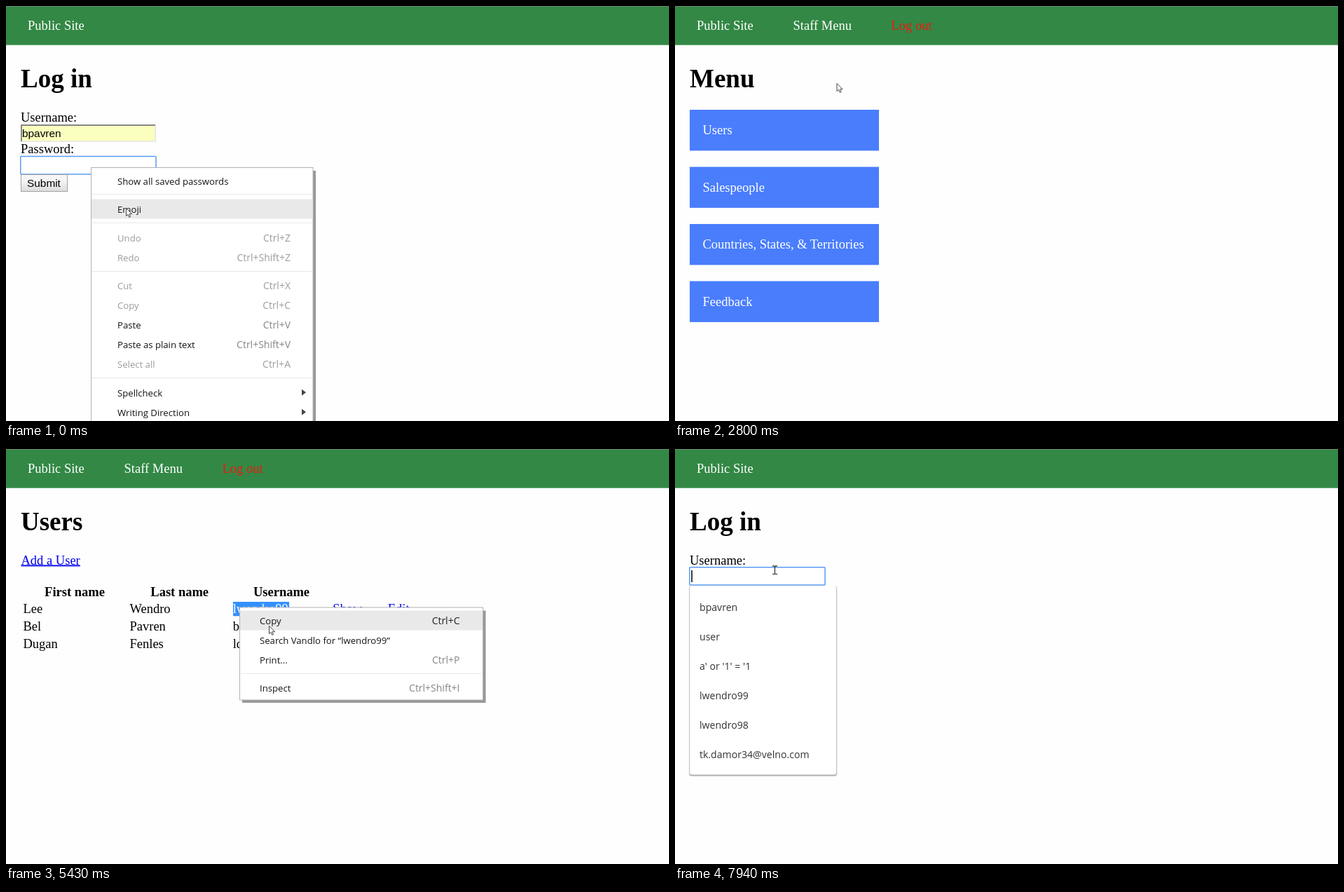
Write an HTML page that moves like this. It is 946x592 px and loops after 8 s.

```html
<!DOCTYPE html>
<html lang="en">
<head>
<meta charset="utf-8">
<title>Log in</title>
<style>
  html, body { margin: 0; width: 100%; height: 100%; overflow: hidden; background: #fefefe; }
  svg { display: block; width: 946px; height: 592px; }
  text { font: 18.5px "Liberation Serif", "Times New Roman", serif; white-space: pre; }
  .h1 { font-size: 37px; font-weight: bold; }
  .th { font-weight: bold; text-anchor: middle; }
  .link { fill: #00e; text-decoration: underline; }
  .field { font: 15.4px "Liberation Sans", Arial, sans-serif; }
  .item { font: 13.15px "Open Sans", "Noto Sans", sans-serif; }
  .key { font: 14px "Open Sans", "Noto Sans", sans-serif; text-anchor: end; }
  .option { font: 14.1px "Open Sans", "Noto Sans", sans-serif; }
</style>
</head>
<body>
<svg id="stage" viewBox="0 0 946 592" xmlns="http://www.w3.org/2000/svg"></svg>
<script>
const LOOP = 8000;
const stage = document.getElementById("stage");

function el(parent, tag, attrs = {}, content) {
  const node = document.createElementNS("http://www.w3.org/2000/svg", tag);
  for (const name in attrs) node.setAttribute(name, attrs[name]);
  if (content !== undefined) node.textContent = content;
  parent.appendChild(node);
  return node;
}
const group = parent => el(parent, "g");
const text = (parent, x, y, str, cls = "", fill = "#000") =>
  el(parent, "text", { x, y, class: cls, ...(cls === "link" ? {} : { fill }) }, str);
const rect = (parent, x, y, width, height, fill, more = {}) =>
  el(parent, "rect", { x, y, width, height, fill, ...more });
const path = (parent, d, fill, more = {}) => el(parent, "path", { d, fill, ...more });
const show = (node, on) => node.setAttribute("visibility", on ? "inherit" : "hidden");
const focusRing = (parent, y) =>
  rect(parent, 20.75, y, 193.3, 25.3, "#fff", { stroke: "#5a9cf2", "stroke-width": 1.5, rx: 1 });

// Shared header
rect(stage, 0, 0, 946, 592, "#fefefe");
rect(stage, 0, 0, 946, 55.7, "#338845");
rect(stage, 0, 0, 946, 1, "#6f8575");
text(stage, 31, 34.2, "Public Site", "", "#fff");
const staffNav = group(stage);
text(staffNav, 168.5, 34.2, "Staff Menu", "", "#fff");
text(staffNav, 308.5, 34.2, "Log out", "", "#f01810");

// Log in page
const login = group(stage);
text(login, 21, 115.5, "Log in", "h1");
text(login, 21, 164.5, "Username:");
text(login, 21, 210, "Password:");

const filledName = group(login);
rect(filledName, 21, 169, 193, 25, "#e6e6e6");
path(filledName, "M21 194V169H214L212 171H23V192Z", "#858585");
rect(filledName, 23, 171, 189.3, 21.3, "#faffbd");
text(filledName, 23, 187.2, "bpavren", "field");

const plainName = group(login);
rect(plainName, 21.5, 169.5, 192, 24, "#fff", { stroke: "#a9a9a9" });
const activeName = group(login);
focusRing(activeName, 168.8);
rect(activeName, 23.3, 173, 1.5, 17, "#000");

rect(login, 21.5, 215.5, 192, 24, "#fff", { stroke: "#a9a9a9" });
const activePass = focusRing(login, 214.6);
const dots = text(login, 23, 232.4, "•".repeat(12), "field");

const shade = el(el(stage, "defs"), "linearGradient", { id: "shade", x1: 0, y1: 0, x2: 0, y2: 1 });
el(shade, "stop", { offset: 0.35, "stop-color": "#f5f5f5" });
el(shade, "stop", { offset: 1, "stop-color": "#dcdcdc" });
rect(login, 21.5, 240.5, 66, 24, "url(#shade)", { stroke: "#a2a2a2" });
text(login, 30, 258, "Submit", "field");

// Saved name suggestions
const saved = group(login);
rect(saved, 20, 197, 211.5, 270, "#000", { rx: 4, opacity: 0.1 });
rect(saved, 20.2, 195, 210.8, 271.4, "#b4b4b4", { rx: 4 });
rect(saved, 21, 195, 209.2, 269.6, "#fff", { rx: 3.5 });
["bpavren", "user", "a' or '1' = '1", "lwendro99", "lwendro98", "tk.damor34@velno.com"]
  .forEach((name, i) => text(saved, 35, 231 + 42 * i, name, "option", "#333"));

// Staff menu page
const staff = group(stage);
text(staff, 21, 115.5, "Menu", "h1");
const tiles = ["Users", "Salespeople", "Countries, States, & Territories", "Feedback"].map((name, i) => {
  const y = 148 + 81.5 * i;
  const tile = rect(staff, 21, y, 270, 58.4, "#497dfc");
  text(staff, 39.5, y + 35.3, name, "", "#fff");
  return tile;
});

// Users page
const users = group(stage);
text(users, 21, 115.5, "Users", "h1");
text(users, 21.5, 164.5, "Add a User", "link");
text(users, 98, 209.5, "First name", "th");
text(users, 247.7, 209.5, "Last name", "th");
text(users, 393, 209.5, "Username", "th");
[["Lee", "Wendro", "lwendro99"], ["Bel", "Pavren", "bpavren"], ["Dugan", "Fenles", "ldfenles"]]
  .forEach((row, i) => {
    const y = 234.4 + 25 * i;
    row.forEach((cell, c) => text(users, [24.5, 176.5, 323.7][c], y, cell));
    text(users, 466.3, y, "Show", "link");
    text(users, 544.7, y, "Edit", "link");
  });
const clip = el(el(stage, "defs"), "clipPath", { id: "picked" });
const pickedArea = rect(clip, 324, 218, 80, 20.6, "#000");
const picked = el(users, "g", { "clip-path": "url(#picked)" });
rect(picked, 324, 218, 80, 20.6, "#3390ff");
text(picked, 323.7, 234.4, "lwendro99", "", "#fff");

// Context menus. Row: [centre, label, shortcut, disabled]
function contextMenu(x, y, w, h, rows, lines, keyX) {
  const g = group(stage);
  rect(g, x + 4, y + 5, w - 1.5, h - 2.5, "#989898");
  rect(g, x + 0.5, y + 0.5, w - 2, h - 2, "#fff", { stroke: "#b2b2b2" });
  const mark = rect(g, x + 1, 0, w - 3, 28, "#e9e9e9");
  lines.forEach(ly => rect(g, x + 2, ly, w - 5, 1, "#e6e6e6"));
  const keys = rows.map(([cy, label, key, off]) => {
    text(g, x + 38, cy + 4.8, label, "item", off ? "#9c9c9c" : "#151515");
    if (key === ">") path(g, `M${x + 301} ${cy - 5.2}l6 4.5l-6 4.5z`, "#444");
    return key && key !== ">" ? text(g, keyX, cy + 4.8, key, "key", off ? "#9c9c9c" : "#858585") : null;
  });
  const hover = cy => {
    const at = rows.findIndex(row => !row[3] && Math.abs(row[0] - cy) <= 14);
    show(mark, at >= 0);
    if (at >= 0) mark.setAttribute("y", rows[at][0] - 14.5);
    keys.forEach((node, i) => {
      if (node && !rows[i][3]) node.setAttribute("fill", i === at ? "#222" : "#858585");
    });
  };
  return { g, hover };
}

const fieldMenu = contextMenu(121, 230, 318.5, 400, [
  [250, "Show all saved passwords"],
  [290, "Emoji"],
  [331, "Undo", "Ctrl+Z", true],
  [359, "Redo", "Ctrl+Shift+Z", true],
  [399.5, "Cut", "Ctrl+X", true],
  [427.5, "Copy", "Ctrl+C", true],
  [455.5, "Paste", "Ctrl+V"],
  [483.5, "Paste as plain text", "Ctrl+Shift+V"],
  [511.5, "Select all", "Ctrl+A", true],
  [552, "Spellcheck", ">"],
  [580, "Writing Direction", ">"]
], [268, 308.7, 378, 530], 406);

const textMenu = contextMenu(333, 225.5, 349, 134, [
  [245, "Copy", "Ctrl+C"],
  [273, "Search Vandlo for “lwendro99”"],
  [301, "Print...", "Ctrl+P"],
  [341, "Inspect", "Ctrl+Shift+I"]
], [319.8], 647.5);
textMenu.g.querySelectorAll(".item").forEach(node => node.setAttribute("x", 362));

// Pointers, drawn around their hot spot
const pointer = group(stage);
const ink = { stroke: "#333", "stroke-width": 0.9, "stroke-linejoin": "round" };
const shapes = {
  arrow: path(pointer, "M.5 .5V11.6L3 9.3L4.8 13.4L6.6 12.6L4.9 8.7H8.6Z", "#fff", ink),
  beam: path(pointer, "M-3.5 -5.8H-1L0 -5L1 -5.8H3.5M0 -5V5M-3.5 5.8H-1L0 5L1 5.8H3.5", "none",
    { stroke: "#222", "stroke-width": 1.1 }),
  hand: path(pointer, "M-1.2 8V1Q0 -.6 1.2 1V5L6 6.2Q7 6.6 7 8V11L5.6 15H-1.6L-5 9.6Q-4.6 7.6 -2.8 9L-1.2 10.4Z", "#fff", ink)
};

// The screen refreshes in bursts: [first, last, count]
const bursts = [
  [0, 0, 1], [120, 1090, 8], [1220, 2020, 7], [2170, 2170, 1], [2290, 2800, 5], [2950, 3220, 3],
  [3340, 3460, 2], [3600, 4140, 5], [4410, 4680, 3], [4930, 5430, 5], [5560, 5840, 3],
  [6150, 7070, 8], [7220, 7940, 6]
];
function snap(t) {
  const [a, b, n] = bursts.filter(burst => burst[0] <= t).pop();
  if (t >= b) return b;
  const step = (b - a) / (n - 1);
  return a + Math.floor((t - a) / step + 1e-6) * step;
}

// Pointer path: [time, x, y, shape]
const route = [
  [0, 171, 288, "arrow"], [536, 180, 412, "arrow"], [813, 184, 452, "arrow"], [951, 181, 449, "arrow"],
  [1090, 152, 410, "arrow"], [1356, 62, 264, "arrow"], [1491, 57, 251, "arrow"], [1627, 66, 249, "arrow"],
  [2020, 294.8, 217, "arrow"], [2170, 348, 206, "arrow"], [2290, 363, 192, "arrow"],
  [2545, 300, 124, "arrow"], [2800, 230.5, 110, "arrow"], [2950, 221, 135, "arrow"],
  [3050, 212, 165, "hand"], [3220, 207, 186, "hand"], [3340, 206.8, 189, "arrow"], [3460, 206.8, 189.3, "arrow"],
  [3735, 310, 213, "arrow"], [3865, 375, 228, "beam"], [4140, 404, 230, "beam"],
  [4410, 380, 230, "beam"], [4545, 325, 230, "beam"], [4680, 292.8, 230, "arrow"],
  [4930, 318, 229, "arrow"], [5055, 333, 227, "beam"], [5180, 334, 228, "arrow"],
  [5430, 375, 252, "arrow"], [5560, 385, 268, "arrow"], [5700, 398, 276, "arrow"],
  [5840, 405, 243, "arrow"], [6150, 405, 242, "arrow"], [6675, 363, 95, "arrow"],
  [6900, 337, 37, "hand"], [7070, 335, 33, "hand"], [7220, 335, 34, "arrow"],
  [7364, 300, 68, "arrow"], [7508, 205, 138, "arrow"], [7650, 146, 176, "beam"], [7940, 142.5, 172.7, "beam"]
];
function pointerAt(t) {
  const i = route.findLastIndex(key => key[0] <= t);
  const a = route[i], b = route[i + 1] || a;
  const k = b === a ? 0 : (t - a[0]) / (b[0] - a[0]);
  return { x: a[1] + (b[1] - a[1]) * k, y: a[2] + (b[2] - a[2]) * k, shape: a[3] };
}

function draw(t) {
  const { x, y, shape } = pointerAt(snap(t));
  const within = (a, b) => t >= a && t < b;
  const back = t >= 7220;
  const onLogin = t < 2170 || back;
  const onStaff = within(2170, 3340);

  show(login, onLogin);
  show(staffNav, !onLogin);
  show(staff, onStaff);
  show(users, within(3340, 7220));

  show(filledName, !back);
  show(plainName, back);
  show(activeName, t >= 7650);
  show(saved, t >= 7795);
  show(activePass, t < 1627);
  show(dots, within(950, 2170));
  tiles[0].setAttribute("fill", onStaff && x < 291 && y > 148 ? "#3b6ce8" : "#497dfc");

  const from = t < 4680 ? Math.min(404, Math.max(324, x)) : 324;
  show(picked, within(4410, 7220));
  pickedArea.setAttribute("x", from);
  pickedArea.setAttribute("width", 404 - from);

  show(fieldMenu.g, t < 950);
  show(textMenu.g, within(5180, 6150));
  // Keep hidden menus free of a visible highlight
  fieldMenu.hover(t < 950 ? y + 2 : 0);
  textMenu.hover(within(5180, 6150) ? y : 0);

  for (const name in shapes) show(shapes[name], name === shape);
  pointer.setAttribute("transform", `translate(${x} ${y})`);
}

const start = performance.now();
function tick() {
  draw((performance.now() - start) % LOOP);
  requestAnimationFrame(tick);
}
tick();
</script>
</body>
</html>
```
